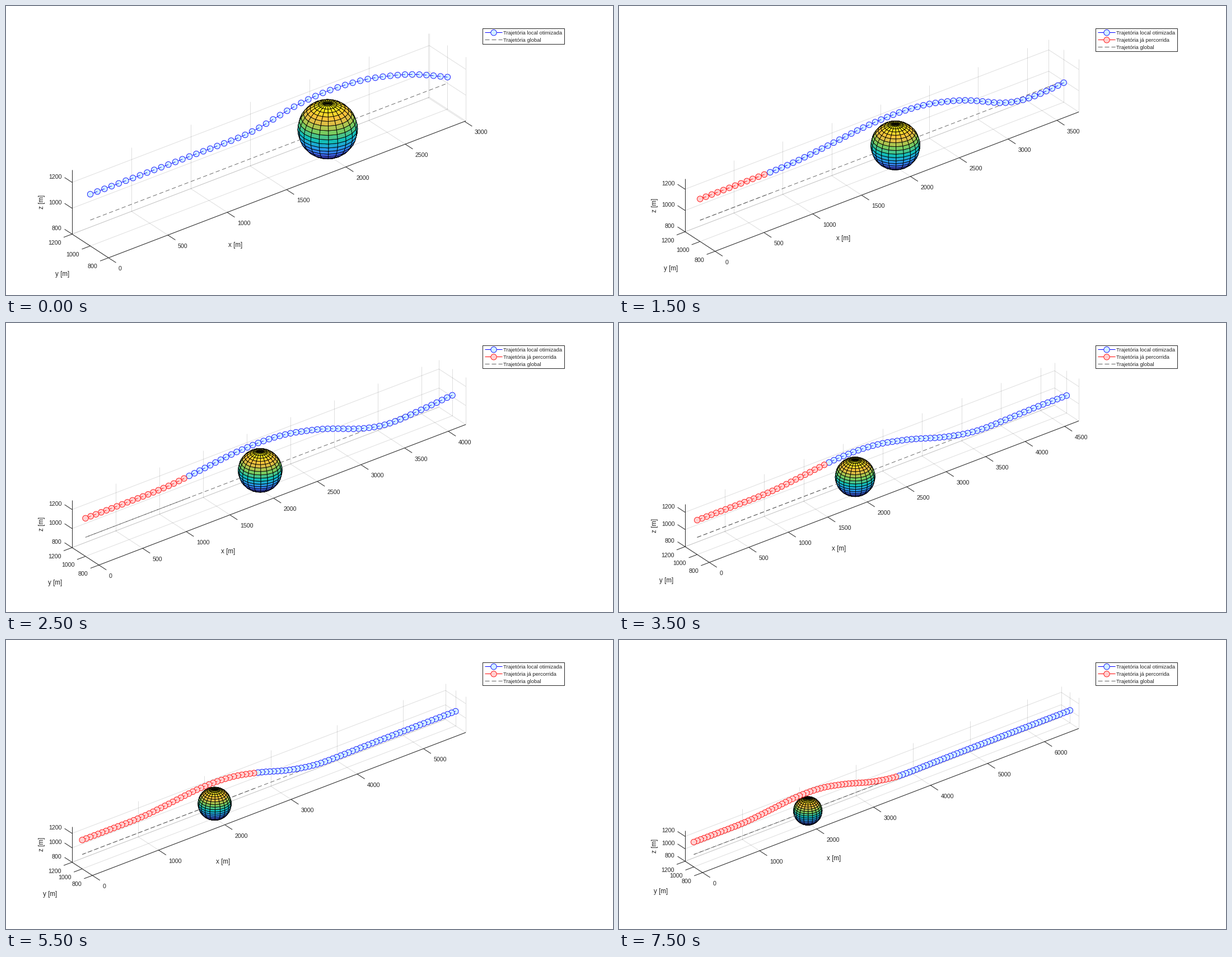
A matplotlib script for the animation above (8000 ms loop, 1084 by 517 pixels).

```python
import numpy as np
import matplotlib.pyplot as plt
from matplotlib.animation import FuncAnimation
from matplotlib.collections import LineCollection, PolyCollection
from matplotlib.colors import LinearSegmentedColormap
from matplotlib.patches import Rectangle

W, H, DPI = 1084, 517, 100
PX = 72 / DPI
STEPS = 16
LEFT, RIGHT, MIDDLE = 118, 821, 249.5
C, S = np.cos(np.radians(37.5)), np.sin(np.radians(37.5))
CE, SE = np.cos(np.radians(30)), np.sin(np.radians(30))
LOW, HIGH, TOP = 800, 1200, 1296
TICKS = (800, 1000, 1200)
INK = "#262626"
BLUE, SKY = "#0000ff", "#d2f0ff"
RED, PINK = "#ff0000", "#ffd0d0"
GRAY = "#5e5e5e"
DASH, PERIOD = 7.5, 12
THIN = .85 * PX
PARULA = LinearSegmentedColormap.from_list("parula", [
    (.2422, .1504, .6603), (.2780, .3556, .9777), (.1540, .5902, .9218),
    (.0704, .7457, .7258), (.5044, .7993, .3480), (.9871, .7348, .2438),
    (.9769, .9839, .0805)])

# settled path: height above z = 1000 by x, and lead along x by waypoint
HEIGHT = np.array([
    (0, 200), (480, 199), (800, 200), (1000, 209), (1124, 221), (1367, 248),
    (1610, 277), (1731, 288), (1854, 294), (2000, 296), (2150, 290),
    (2345, 268), (2526, 231), (2705, 189), (2880, 139), (3053, 89),
    (3237, 49), (3416, 18), (3600, 0), (3800, -3), (4100, 0), (6600, 0)], float)
LEAD = np.array([
    (0, 0), (12, -3), (20, -12), (28, -10), (33, -3), (36, 3), (44, 14),
    (52, 8), (60, 4), (70, 0), (110, 0)], float)


def smooth(t, knots):
    """Cubic Hermite curve through the knots."""
    kt, kv = knots.T
    m = np.gradient(kv, kt)
    j = np.clip(np.searchsorted(kt, t, "right") - 1, 0, len(kt) - 2)
    h = kt[j + 1] - kt[j]
    u = (t - kt[j]) / h
    return (kv[j] * (1 + 2 * u) * (1 - u) ** 2 + kv[j + 1] * u * u * (3 - 2 * u)
            + h * m[j] * u * (1 - u) ** 2 - h * m[j + 1] * u * u * (1 - u))


def bell(t, center, width):
    return np.exp(-((t - center) / width) ** 2)


def plan(k):
    """Waypoints x, z of the trajectory at step k."""
    n = 51 + 4 * k
    i = np.arange(n)
    fresh = max(0, 1 - k / 3)
    reach = 10 * k if k < 3 else 0
    x = (60 * i + smooth(i, LEAD) - 18 * fresh * bell(i, 33, 8)
         + reach * np.exp((i - n + 1) / 2))
    # early plans climb later and swing below the global line before settling
    late = max(k - 3, 0)
    u = (x - 3220 - 65 * late) / 400
    swing = max(0, 70 - 15 * late) * (bell(u, 0, 1) - .4 * bell(u, 2.2, .5))
    z = 1000 + smooth(x, HEIGHT) - 42 * fresh * bell(x, 1370, 330) - swing
    return x, z


class View:
    """Orthographic view that fits the box into the stage."""

    def __init__(self, xmax):
        depth = HIGH - LOW
        self.s = (RIGHT - LEFT) / (xmax * C + depth * S)
        tall = self.s * (SE * (xmax * S + depth * C) + CE * (TOP - LOW))
        self.ox = LEFT + self.s * depth * S
        self.oy = MIDDLE + tall / 2

    def __call__(self, x, y, z):
        y = np.asarray(y) - LOW
        px = self.ox + self.s * (x * C - y * S)
        up = SE * (x * S + y * C) + CE * (np.asarray(z) - LOW)
        return np.stack(np.broadcast_arrays(px, self.oy - self.s * up), -1)


def dashes(a, b, shift=0):
    length = np.hypot(*(b - a))
    unit = (b - a) / length
    starts = np.arange(-(shift % PERIOD), length, PERIOD)
    spans = [(max(t, 0), min(t + DASH, length)) for t in starts]
    return [(a + unit * p, a + unit * q) for p, q in spans if q > p]


def sphere_mesh(n=20):
    lon = np.linspace(-np.pi, np.pi, n + 1)
    lat = np.linspace(-np.pi / 2, np.pi / 2, n + 1)[:, None]
    xyz = np.stack(np.broadcast_arrays(
        np.cos(lat) * np.cos(lon), np.cos(lat) * np.sin(lon), np.sin(lat)), -1)
    quads = np.stack([xyz[:-1, :-1], xyz[:-1, 1:], xyz[1:, 1:], xyz[1:, :-1]], 2)
    quads = quads.reshape(-1, 4, 3)
    near = quads.mean(1) @ np.array([-CE * S, -CE * C, SE])
    quads = quads[np.argsort(near)]
    return quads, PARULA((quads[:, 0, 2] + 1) / 2)


QUADS, SHADES = sphere_mesh()
ANGLE = np.linspace(0, 2 * np.pi, 32, endpoint=False)
RING = 5.2 * np.stack([np.cos(ANGLE), np.sin(ANGLE)], -1)

fig = plt.figure(figsize=(W / DPI, H / DPI), dpi=DPI, facecolor="white")
ax = fig.add_axes([0, 0, 1, 1])


def lines(segs, color, z, width=1.0, alpha=None):
    ax.add_collection(LineCollection(
        segs, colors=color, linewidths=width * PX, alpha=alpha, zorder=z))


def label(x, y, s, size=10.6, **kw):
    kw = {"ha": "center", "va": "center", **kw}
    ax.text(x, y, s, family="Liberation Sans", fontsize=size * PX,
            color=INK, zorder=8, **kw)


def draw_grid(view, xmax, xticks):
    segs = []
    for x in xticks:
        segs.append(view(x, [LOW, HIGH], LOW))
        segs.append(view(x, HIGH, [LOW, TOP]))
    ends = np.array([0, xmax])
    for v in TICKS:
        segs.append(view(ends, v, LOW))
        segs.append(view(xmax, v, [LOW, TOP]))
        segs.append(view(ends, HIGH, v))
        segs.append(view(xmax, [LOW, HIGH], v))
    lines(segs, INK, 1, alpha=.15)


def draw_axes(view, xmax, xticks):
    segs = [view(np.array([0, xmax]), LOW, LOW), view(0, [LOW, HIGH], LOW),
            view(0, HIGH, [LOW, TOP])]

    def tick(p, d):
        segs.append((p, p + np.array(d)))

    for x in xticks:
        p = view(x, LOW, LOW)
        tick(p, (13.4, 8.7))
        label(p[0] + 18, p[1] + 20, f"{x}", ha="left")
    for v in TICKS:
        p = view(0, v, LOW)
        tick(p, (-15, 5.7))
        label(p[0] - 19.5, p[1] + 16, f"{v}", ha="right")
        p = view(0, HIGH, v)
        tick(p, (-13.4, -8.7))
        label(p[0] - 18.5, p[1] - 9.8, f"{v}", ha="right")
    lines(segs, INK, 2)

    s = view.s
    mid = view(xmax / 2, LOW, LOW)
    label(mid[0] - 109.5 + 63 * s, mid[1] + 107.7 - 28.8 * s, "x [m]", 11.6)
    mid = view(0, 1000, LOW)
    label(mid[0] - 67 + 65.5 * s, mid[1] + 39.3 + 41 * s, "y [m]", 11.6)
    label(63.5, view(0, HIGH, (LOW + TOP) / 2)[1], "z [m]", 11.6, rotation=90)


def draw_global(view, xmax, k):
    def part(x0, x1, shift, z):
        a, b = view(x0, 1000, 1000), view(x1, 1000, 1000)
        shift += np.hypot(*(a - view(0, 1000, 1000)))
        lines(dashes(a, b, shift), GRAY, z, .9)

    # the line enters the sphere at x = 1800
    enter, done = 1800, 240 * k
    part(0, enter, 0, 4)
    part(enter, xmax, 0, 2)
    if done:
        shift = 3.4 * abs(k - 7) % PERIOD
        part(0, min(done, enter), shift, 4)
        if done > enter:
            part(enter, done, shift, 2)


def draw_sphere(view):
    x, y, z = np.moveaxis(200 * QUADS, -1, 0)
    ax.add_collection(PolyCollection(
        view(2000 + x, 1000 + y, 1000 + z), facecolors=SHADES,
        edgecolors="black", linewidths=THIN, zorder=3))


def draw_path(view, x, z, done):
    """Far to near, so each marker hides the start of its own segment."""
    pts = view(x, 1000, z)
    polys, faces, edges = [], [], []
    for i in range(len(pts) - 1, -1, -1):
        edge, face = (RED, PINK) if i < done else (BLUE, SKY)
        if i + 1 < len(pts) and i + 1 != done:
            polys.append(pts[i:i + 2])
            faces.append("none")
            edges.append(edge)
        polys.append(pts[i] + RING)
        faces.append(face)
        edges.append(edge)
    ax.add_collection(PolyCollection(
        polys, closed=False, facecolors=faces, edgecolors=edges,
        linewidths=THIN, zorder=5))


def draw_legend(travelled):
    rows = [("Trajetória local otimizada", BLUE, SKY)]
    if travelled:
        rows.append(("Trajetória já percorrida", RED, PINK))
    rows.append(("Trajetória global", GRAY, None))
    ax.add_patch(Rectangle((850.5, 39.5), 146.5, 2 + 13 * len(rows), fc="white",
                           ec=INK, lw=PX, zorder=6))
    for r, (name, edge, face) in enumerate(rows):
        y = 47.2 + 13.1 * r
        a, b = np.array([855, y]), np.array([886, y])
        if face:
            lines([(a, b)], edge, 7)
            ax.add_collection(PolyCollection(
                [(870.5, y) + RING], facecolors=face, edgecolors=edge,
                linewidths=THIN, zorder=8))
        else:
            lines(dashes(a, b), edge, 7)
        label(888, y + 3.6, name, 9.5, ha="left", va="baseline")


def draw(k):
    ax.clear()
    ax.set(xlim=(0, W), ylim=(H, 0))
    ax.axis("off")
    x, z = plan(k)
    xmax = x[-1]
    view = View(xmax)
    xticks = range(0, int(xmax) + 1, 500 if xmax < 5300 else 1000)
    draw_grid(view, xmax, xticks)
    draw_axes(view, xmax, xticks)
    draw_global(view, xmax, k)
    draw_sphere(view)
    draw_path(view, x, z, 4 * k)
    draw_legend(k > 0)
    return []


# closing point, so that open outlines still make full circles
RING = np.vstack([RING, RING[:1]])

anim = FuncAnimation(fig, draw, frames=STEPS, init_func=lambda: draw(0),
                     interval=500, repeat=True, repeat_delay=0)
plt.show()
```
